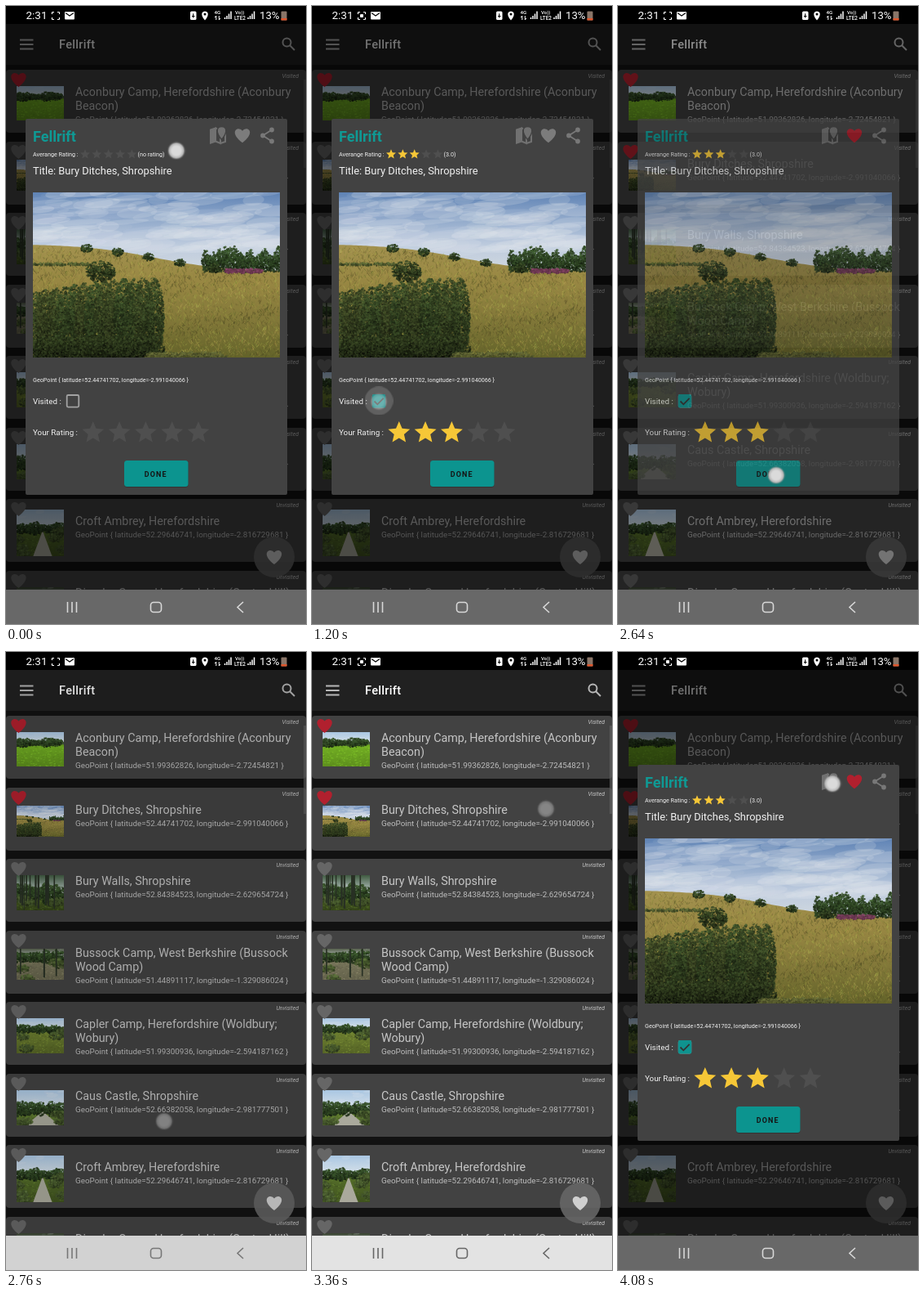
These frames come from a looping animation (368 by 756 pixels, 4200 ms). An HTML page with a canvas:

```html
<!DOCTYPE html>
<html lang="en">
<head>
<meta charset="utf-8">
<title>Fellrift</title>
<style>
html, body { margin: 0; width: 100%; height: 100%; overflow: hidden; background: #000; }
#stage { position: relative; width: 368px; height: 756px; overflow: hidden; background: #121212; font-family: Roboto, sans-serif; }
:where(#stage div, svg, canvas) { position: absolute; left: 0; top: 0; display: block; }
text { font-family: Roboto, sans-serif; white-space: pre; }
.full { width: 368px; height: 756px; }
.card { width: 368px; height: 77px; background: #424242; border-radius: 4px; }
.name { font-size: 14.33px; fill: #c6c6c6; }
.geo { font-size: 9.83px; fill: #bdbdbd; }
.seen { font-size: 6.9px; font-style: italic; fill: #c8c8c8; text-anchor: end; }
.panel { left: 24px; top: 138px; width: 320.5px; height: 460px; border-radius: 2px; background: #424242; }
.spot { border-radius: 50%; transform: translate(-50%, -50%); opacity: 0; }
.ripple { width: 35px; height: 35px; background: #ffffff30; }
.tap { width: 23px; height: 23px; background: radial-gradient(closest-side, #dadada 50%, #b4b4b4 78%, #90909060 88%, #90909000); }

#dim, #dialog, #nav { animation: 4.2s step-end infinite; }
#dim { top: 22px; width: 368px; height: 692px; background: #000; animation-name: dim; }
#dialog { animation-name: dialog; }
#nav { top: 714px; width: 368px; height: 42px; animation-name: nav; }

@keyframes dim { 0% { opacity: .55 } 62.85% { opacity: .45 } 65.71% { opacity: .12 } 68.57% { opacity: 0 } 82.85% { opacity: .56 } }
@keyframes dialog { 0% { opacity: 1 } 62.85% { opacity: .75 } 65.71% { opacity: 0 } 82.85% { opacity: .94 } 85.71% { opacity: 1 } }
@keyframes nav {
  0%, 82.85% { background: #686868; color: #d8d8d8 }
  65.71% { background: #d2d2d2; color: #777 }
  68.57% { background: #e3e3e3; color: #666 }
}
</style>
</head>
<body>
<div id="stage">
  <svg width="0" height="0">
    <defs>
      <path id="heart" d="M0 9C-13-1-10-8-4.500-8Q-1.500-8 0-5.500Q1.500-8 4.500-8C10-8 13-1 0 9z"/>
      <path id="pin" d="M0 8C-9-3-5-8 0-8S9-3 0 8z"/>
    </defs>
  </svg>

  <div id="list"></div>

  <svg class="full">
    <rect y="22" width="368" height="50" fill="#212121"/>
    <path d="M17 41.500h16.500m-16.500 5.500h16.500m-16.500 5.500h16.500" stroke="#b8b8b8" stroke-width="1.800"/>
    <text x="65" y="52.300" font-size="14.600" font-weight="500" letter-spacing=".3" fill="#fff">Fellrift</text>
    <g fill="none" stroke="#b8b8b8" stroke-width="2">
      <circle cx="344.500" cy="44.500" r="5"/>
      <path d="M348 48l6 6"/>
    </g>
    <rect x="365" y="90" width="3" height="108" fill="#666" opacity=".6"/>
    <circle cx="329" cy="674" r="25" fill="#666" opacity=".9"/>
    <use href="#heart" x="329" y="674" fill="#d0d0d0"/>
  </svg>

  <div id="dim"></div>

  <svg width="368" height="22" fill="#fff">
    <rect width="368" height="22" fill="#000"/>
    <text x="24.500" y="16.300" font-size="13.500">2:31</text>
    <rect x="56.500" y="7.500" width="9" height="9" fill="none" stroke="#fff" stroke-width="1.200" stroke-dasharray="2.500 4 2.500 0"/>
    <rect class="dot" x="59" y="10" width="4" height="4" rx="1"/>
    <rect x="72" y="7" width="12" height="9.500" rx="1"/>
    <path d="M73 8.500l5 3.500 5-3.500" fill="none" stroke="#000" stroke-width="1.200"/>
    <rect x="226" y="6.500" width="7.500" height="10.500" rx="1.500"/>
    <path d="M229.700 9.300v5.200m-1.700-2h3.500" stroke="#000" stroke-width="1.100"/>
    <use href="#pin" transform="translate(244 12) scale(.7)"/>
    <circle cx="244" cy="10" r="1.500" fill="#000"/>
    <text x="255.500" y="10.300" font-size="6.200" font-weight="500">4G</text>
    <path d="M257.800 17v-5l-1.600 2m5.100-2v5l1.600-2" fill="none" stroke="#fff"/>
    <path id="bars" d="M268.500 16v-2m2.500 2v-4m2.500 4v-6.500m2.500 6.500v-9.500" stroke="#fff" stroke-width="1.500"/>
    <use href="#bars" x="28.500"/>
    <text x="281" y="10.300" font-size="6" font-weight="500">Vo))</text>
    <text x="280" y="17" font-size="6.400" font-weight="500">LTE2</text>
    <text x="311" y="16.300" font-size="13.200">13%</text>
    <rect x="337.500" y="6.500" width="7" height="11" rx="1" fill="#8a7568"/>
    <rect x="337.500" y="15" width="7" height="2.500" fill="#e0562c"/>
  </svg>

  <div id="dialog" class="full">
    <div class="panel"></div>
    <div id="ripples"></div>
    <svg class="full" fill="#f0f0f0">
      <text x="33" y="165.500" font-size="18" font-weight="700" fill="#0f9994">Fellrift</text>
      <g fill="none" stroke="#717171" stroke-width="2">
        <path d="M251 151.500l6-2v16l-6 2z" fill="#717171"/>
        <path d="M257 149.500l6 2.500v16l-6-2.500m6 2.500l6-2v-16"/>
        <use href="#pin" x="264.500" y="155.500" fill="#717171" stroke="#424242" stroke-width="1.500"/>
      </g>
      <use class="like" href="#heart" x="290" y="158.200"/>
      <g fill="#787878" stroke="#787878" stroke-width="1.800">
        <path d="M326 151.500l-11 7 11 7" fill="none"/>
        <circle cx="326" cy="151.500" r="2"/>
        <circle cx="315" cy="158.500" r="2"/>
        <circle cx="326" cy="165.500" r="2"/>
      </g>
      <g font-size="7.200">
        <text x="33" y="183.600">Averange Rating :</text>
        <text class="unrated" x="161.500" y="183.600">(no rating)</text>
        <text class="rated" x="161.500" y="183.600">(3.0)</text>
        <text x="33" y="459.700">GeoPoint { latitude=52.44741702, longitude=-2.991040066 }</text>
      </g>
      <text x="33" y="206.300" font-size="12.900">Title: Bury Ditches, Shropshire</text>
      <g font-size="9.800">
        <text x="33" y="486.800">Visited :</text>
        <text x="33" y="524.800">Your Rating :</text>
      </g>
      <g id="stars"></g>
      <rect x="74.700" y="476" width="14.600" height="14.600" rx="1.500" fill="none" stroke="#a2a2a2" stroke-width="1.800"/>
      <g class="tick">
        <rect x="73.800" y="475.100" width="16.400" height="16.400" rx="2" fill="#0f938f"/>
        <path d="M76.500 483.500l3.800 3.800 7.300-7.500" fill="none" stroke="#333" stroke-width="1.800"/>
      </g>
      <rect x="145" y="557" width="78.500" height="32" rx="3.500" fill="#000" opacity=".2"/>
      <rect x="145" y="556" width="78.500" height="32" rx="3.500" fill="#0c948f"/>
      <text x="169.700" y="575.500" font-size="8.950" font-weight="700" letter-spacing="1.150" fill="#151515">DONE</text>
    </svg>
    <canvas id="photo" width="303" height="202" style="left:33px;top:228px"></canvas>
  </div>

  <div id="nav">
    <svg width="368" height="42" fill="none" stroke="currentColor" stroke-width="1.600">
      <path d="M75.500 15v13m5.500-13v13m5.500-13v13M291 15l-7 6.500 7 6.500"/>
      <rect x="177.500" y="15.500" width="13" height="12" rx="3.500"/>
    </svg>
  </div>
  <div id="taps"></div>
</div>

<script>
const $ = id => document.getElementById(id);
const LOOP = 4200, TICK = 120;
const RED = '#b1202e', YELLOW = '#f6c737';

// Loop a style given as a function of time, held for one tick each.
function play(selector, styleAt) {
  const frames = [];
  for (let t = 0; t < LOOP; t += TICK) frames.push({ ...styleAt(t), offset: t / LOOP, easing: 'step-end' });
  document.querySelectorAll(selector).forEach(el => el.animate(frames, { duration: LOOP, iterations: Infinity }));
}
const show = (selector, from) => play(selector, t => ({ opacity: t >= from ? 1 : 0 }));
const hide = (selector, from) => play(selector, t => ({ opacity: t < from ? 1 : 0 }));
const paint = (selector, from, a, b) => play(selector, t => ({ fill: t < from ? a : b }));

// Place a round spot that appears at a time and fades with its age.
function spot(parent, kind, x, y, start, fadeAt) {
  const el = document.createElement('div');
  el.className = 'spot ' + kind;
  el.id = kind + start;
  el.style.left = x + 'px';
  el.style.top = y + 'px';
  $(parent).append(el);
  play('#' + el.id, t => ({ opacity: t < start ? 0 : fadeAt(t - start) }));
}
const tap = (x, y, start) => spot('taps', 'tap', x, y, start, age => age < 360 ? Math.exp(-age / 150) : 0);
const ripple = (x, y, start) => spot('ripples', 'ripple', x, y, start, age => Math.max(0, 1 - age / 840));

let seed = 7;
const rnd = (a = 0, b = 1) => {
  seed = (seed * 16807) % 2147483647;
  return a + (b - a) * seed / 2147483647;
};

function fade(c, y0, y1, ...colors) {
  const g = c.createLinearGradient(0, y0, 0, y1);
  colors.forEach((col, i) => g.addColorStop(i / (colors.length - 1), col));
  return g;
}

// A clump of fine leaf dabs, lighter towards its top.
function bush(c, x, y, rx, ry, hue = 88, light = 17) {
  for (let n = rx * ry * 2 + 15; n > 0; n--) {
    const a = rnd(0, 7), r = rnd() ** .6, up = -Math.sin(a) * r;
    c.fillStyle = `hsl(${hue} 32% ${light + up * 5 + rnd(-8, 8)}% / .85)`;
    c.beginPath();
    c.arc(x + Math.cos(a) * r * rx, y - up * ry, rnd(.5, 1.5), 0, 7);
    c.fill();
  }
}

function clouds(c, w, h, n) {
  for (; n > 0; n--) {
    const y = rnd(0, h);
    c.fillStyle = `rgba(222,227,233,${rnd(.05, .25)})`;
    c.beginPath();
    c.ellipse(rnd(0, w), y, w * rnd(.04, .13), h * rnd(.04, .1), -.08, 0, 7);
    c.fill();
  }
}

function paintHill(c, w, h) {
  const ridge = x => 63 + 34 / (1 + Math.exp((150 - x) / 45));
  c.fillStyle = fade(c, 0, 95, '#5f83b5', '#8fa8ca', '#bccadd', '#d0d8e0');
  c.fillRect(0, 0, w, h);
  clouds(c, w, 72, 150);

  c.fillStyle = fade(c, 62, h, '#a3924f', '#988743', '#827839', '#636329');
  c.beginPath();
  c.moveTo(0, h);
  for (let x = 0; x <= w; x += 3) c.lineTo(x, ridge(x));
  c.lineTo(w, h);
  c.fill();

  for (let i = 0; i < 5000; i++) {
    const x = rnd(0, w), y = rnd(ridge(x) + 4, h);
    const wave = 6 * Math.sin(y / 9 + x / 40);
    c.strokeStyle = `hsl(${rnd(42, 68)} 40% ${rnd(22, 50) + wave}% / .45)`;
    c.beginPath();
    c.moveTo(x, y);
    c.lineTo(x + rnd(-3, 3), y - rnd(1, 5));
    c.stroke();
  }

  for (let x = 212; x < w; x += 6) {
    const tall = rnd(10, 17);
    bush(c, x, 98 - tall, 5, tall, 100, 19);
  }
  for (let x = 240; x < 285; x += 9) bush(c, x, 96, 6, 3, 330, 34);
  for (let x = 66; x < 190; x += 38) bush(c, x, ridge(x) + 1, 7, 5, 95, 18);
  for (let x = 0; x < 80; x += 16) bush(c, x, 88, 9, 2, 75, 26);
  bush(c, 223, 93, 7, 6);
  bush(c, 83, 97, 18, 13);
  for (let x = 4; x < 150; x += 12) {
    const top = 122 - 18 * Math.sin(x / 95);
    bush(c, x, (top + h) / 2, 13, (h - top) / 2, rnd(78, 92), 18);
    bush(c, x, h - 8, 14, 18, 85, 13);
  }
  for (let x = 150; x < 240; x += 15) bush(c, x, h, 14, 7, 66, 25);
}

// A small countryside view: sky, hedge line, ground, scattered shrubs.
function paintView(c, w, h, { sky = '#a9c6e2', horizon = .35, hue = 82, sat = 45, light = 35, hedge = 5, shrubs = 4, trunks = 0, road = 0 }) {
  const y = h * horizon;
  c.fillStyle = fade(c, 0, y, sky, '#dde5ea');
  c.fillRect(0, 0, w, y);
  clouds(c, w, y, 12);
  c.fillStyle = fade(c, y, h, `hsl(${hue} ${sat}% ${light}%)`, `hsl(${hue} ${sat}% ${light - 8}%)`);
  c.fillRect(0, y, w, h);
  for (let i = 0; i < 250; i++) {
    c.fillStyle = `hsl(${hue} ${sat}% ${light + rnd(-12, 12)}% / .5)`;
    c.fillRect(rnd(0, w), rnd(y, h), 2, 1);
  }
  c.fillStyle = '#aaa99c';
  c.beginPath();
  c.moveTo(w * .55, y);
  c.lineTo(w * (.55 + road), h);
  c.lineTo(w * (.55 - road), h);
  if (road) c.fill();
  for (let x = 0; x <= w; x += 6) bush(c, x, y - hedge / 3, 6, hedge * rnd(.6, 1.2), 100, 19);
  for (let i = 0; i < shrubs; i++) bush(c, i % 2 ? rnd(0, 14) : rnd(w - 14, w), rnd(y, h), 9, 5, 85, 25);
  c.fillStyle = '#283024';
  for (let i = 0; i < trunks; i++) c.fillRect(rnd(0, w), 0, rnd(1, 2.4), h * rnd(.7, 1));
}

const cards = [
  { name: 'Aconbury Camp, Herefordshire (Aconbury|Beacon)', at: 'latitude=51.99362826, longitude=-2.72454821',
    h: 42, view: { hue: 86, sat: 66, light: 42, shrubs: 0 } },
  { name: 'Bury Ditches, Shropshire', at: 'latitude=52.44741702, longitude=-2.991040066', h: 38 },
  { name: 'Bury Walls, Shropshire', at: 'latitude=52.84384523, longitude=-2.629654724',
    h: 43, view: { sky: '#3f5a40', horizon: .6, light: 26, hedge: 12, trunks: 11 } },
  { name: 'Bussock Camp, West Berkshire (Bussock|Wood Camp)', at: 'latitude=51.44891117, longitude=-1.329086024',
    h: 38, view: { sky: '#56604c', hue: 55, sat: 14, light: 42, hedge: 8, trunks: 3 } },
  { name: 'Capler Camp, Herefordshire (Woldbury;|Wobury)', at: 'latitude=51.99300936, longitude=-2.594187162',
    h: 43, view: { hue: 74 } },
  { name: 'Caus Castle, Shropshire', at: 'latitude=52.66382058, longitude=-2.981777501',
    h: 43, view: { horizon: .6, hedge: 8, road: .35 } },
  { name: 'Croft Ambrey, Herefordshire', at: 'latitude=52.29646741, longitude=-2.816729681',
    h: 57, view: { horizon: .45, light: 30, hedge: 7, road: .2, shrubs: 8 } },
  { name: 'Dinedor Camp, Herefordshire (Oyster Hill)', at: 'latitude=52.02, longitude=-2.69',
    h: 43, view: { sky: '#35402c', light: 18 } }
];

paintHill($('photo').getContext('2d'), 303, 202);

const label = (seen, cls = '') => `<text class="seen ${cls}" x="359" y="9.5">${seen}</text>`;
cards.forEach(({ name, at, h, view }, i) => {
  const lines = name.split('|'), line = 16.7;
  const card = document.createElement('div');
  card.className = 'card';
  card.style.top = 78 + i * 87.5 + 'px';
  card.innerHTML = `<svg width="368" height="77">
    ${lines.map((s, k) => `<text class="name" x="85" y="${32.2 + k * line}">${s}</text>`).join('')}
    <text class="geo" x="85" y="${30.5 + lines.length * line}">GeoPoint { ${at} }</text>
    ${view ? label(i ? 'Unvisited' : 'Visited') : label('Visited', 'saved') + label('Unvisited', 'unsaved')}
    </svg>
    <canvas width="58" height="${h}" style="left:13px;top:${Math.round(41 - h / 2)}px"></canvas>
    <svg width="30" height="30"><use href="#heart" class="${view ? '' : 'mine'}" x="15.5" y="12" fill="${i ? '#666' : RED}"/></svg>`;
  $('list').append(card);
  const c = card.querySelector('canvas').getContext('2d');
  if (view) paintView(c, 58, h, view);
  else c.drawImage($('photo'), 0, 0, 58, h);
});

function star(x, y, r, on) {
  const points = Array.from({ length: 10 }, (_, k) => {
    const a = k * Math.PI / 5, d = k % 2 ? r * .455 : r;
    return [x + d * Math.sin(a), y - d * Math.cos(a)].map(v => v.toFixed(2));
  });
  return `<polygon class="${on ? 'star' : ''}" points="${points.join(' ')}" fill="#4f4f4f"/>`;
}
for (let i = 0; i < 5; i++) {
  $('stars').innerHTML += star(97 + i * 14.35, 181.5, 6.3, i < 3) + star(106.8 + i * 32.3, 522, 14.1, i < 3);
}

play('.dot', t => ({ opacity: (t + 264) % 936 < 468 ? 0 : 1 }));

tap(209, 177, 0);

tap(160, 534, 480);
paint('.star', 480, '#4f4f4f', YELLOW);
show('.rated', 480);
hide('.unrated', 480);

tap(82, 484, 1080);
ripple(82, 483, 1080);
show('.tick', 1200);

tap(290, 159, 1440);
ripple(290, 158, 1440);
paint('.like', 1560, '#7c7c7c', RED);

tap(194, 574, 2640);
paint('.mine', 2640, '#666', RED);
show('.saved', 2640);
hide('.unsaved', 2640);

tap(287, 192, 3240);
tap(263, 161, 4080);
</script>
</body>
</html>
```
